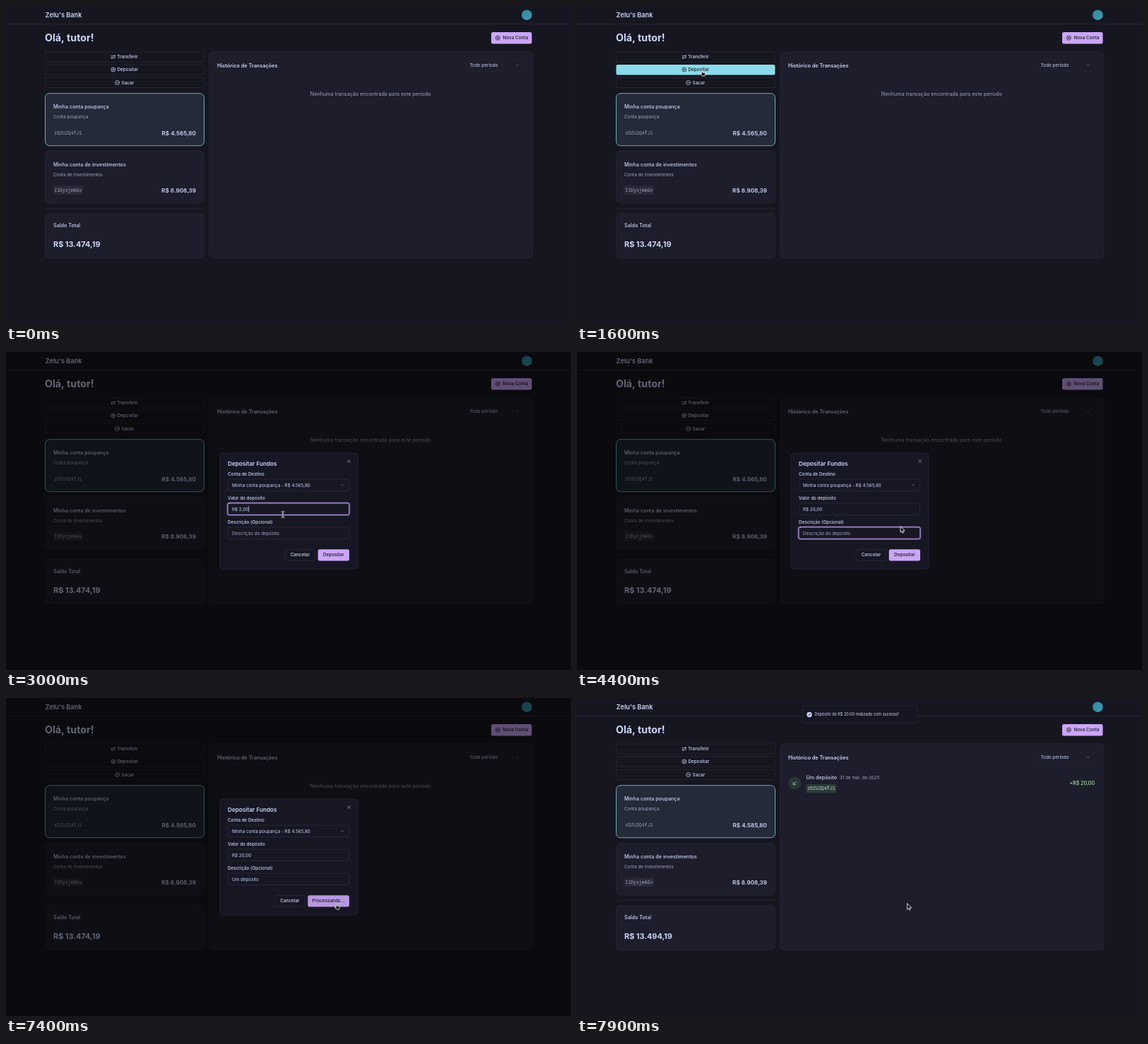
Recreate the animation shown at these times as an HTML page with a canvas. Size 800 by 450 pixels, loop 8 s.

```html
<!DOCTYPE html>
<html lang="pt-BR">
<head>
<meta charset="utf-8">
<title>Painel bancário</title>
<style>
html, body { margin: 0; width: 100%; height: 100%; overflow: hidden; background: #161621; }
canvas { display: block; width: 800px; height: 450px; }
</style>
</head>
<body>
<canvas id="stage"></canvas>
<script>
const canvas = document.getElementById('stage');
const ctx = canvas.getContext('2d');
const dpr = window.devicePixelRatio || 1;
canvas.width = 800 * dpr;
canvas.height = 450 * dpr;

const LOOP = 8000, STEP = 100;
const SANS = 'Inter, sans-serif', MONO = '"Noto Sans Mono", monospace';
const C = {
  bg: '#161621', card: '#1d1d2b', line: '#292939', faint: '#222231', text: '#cdd6f4',
  muted: '#a0a5bd', mauve: '#cba6f7', sky: '#89dceb', green: '#a6e3a1', dark: '#181825'
};
const T = { open: 1700, focusValue: 2300, focusNote: 4100, submit: 7200, close: 7500, update: 7700 };
const NOTE = 'Um depósito';

// Cursor way points: time, x, y
const PATH = [
  [300, 420, 330], [1300, 177, 91], [1600, 177, 91], [1700, 231, 110.5],
  [2200, 392, 226], [2400, 392, 230], [3400, 392, 230], [4100, 440, 256],
  [4400, 458, 247], [6700, 458, 247], [7100, 468, 291], [8000, 467.5, 291]
];

const INPUT_Y = { account: 180, value: 214, note: 248 };

function box(x, y, w, h, r, fill, stroke, lw = 0.7) {
  ctx.beginPath();
  ctx.roundRect(x, y, w, h, r);
  if (fill) { ctx.fillStyle = fill; ctx.fill(); }
  if (stroke) { ctx.strokeStyle = stroke; ctx.lineWidth = lw; ctx.stroke(); }
}

function text(s, x, mid, size, weight = 400, color = C.text, align = 'left', family = SANS) {
  ctx.font = `${weight} ${size}px ${family}`;
  ctx.textAlign = align;
  ctx.fillStyle = color;
  ctx.fillText(s, x, mid + size * 0.35);
}

function lines(color, lw, ...parts) {
  ctx.beginPath();
  for (const p of parts) {
    ctx.moveTo(p[0], p[1]);
    for (let i = 2; i < p.length; i += 2) ctx.lineTo(p[i], p[i + 1]);
  }
  ctx.strokeStyle = color;
  ctx.lineWidth = lw;
  ctx.lineCap = ctx.lineJoin = 'round';
  ctx.stroke();
}

function disc(x, y, r, fill, stroke) {
  ctx.beginPath();
  ctx.arc(x, y, r, 0, Math.PI * 2);
  if (fill) { ctx.fillStyle = fill; ctx.fill(); }
  if (stroke) { ctx.strokeStyle = stroke; ctx.lineWidth = 0.75; ctx.stroke(); }
}

function circleIcon(x, y, color, plus) {
  disc(x, y, 3, null, color);
  lines(color, 0.75, [x - 1.3, y, x + 1.3, y]);
  if (plus) lines(color, 0.75, [x, y - 1.3, x, y + 1.3]);
}

function chevron(x, y) {
  lines('#777b91', 0.7, [x - 1.7, y - 0.8, x, y + 0.8, x + 1.7, y - 0.8]);
}

function swapIcon(x, y, color) {
  lines(color, 0.75,
    [x - 2.8, y - 1.3, x + 2.8, y - 1.3], [x + 1.5, y - 2.5, x + 2.8, y - 1.3, x + 1.5, y - 0.2],
    [x + 2.8, y + 1.4, x - 2.8, y + 1.4], [x - 1.5, y + 0.3, x - 2.8, y + 1.4, x - 1.5, y + 2.6]);
}

function actionButton(y, label, labelX, icon, hot) {
  const color = hot ? C.dark : C.text;
  if (hot) box(55.5, y - 7, 225, 14.4, 2, C.sky);
  else box(55.5, y - 7, 225, 14, 2, C.bg, C.line);
  icon(color);
  text(label, labelX, y, 6.4, 500, color);
}

function account(y, name, kind, code, total, active) {
  box(55.5, y, 225, 74, 6, active ? '#232a38' : C.card, active ? '#78bcc8' : C.line, active ? 0.9 : 0.7);
  text(name, 67, y + 19, 7.2, 500);
  text(kind, 67, y + 33.5, 6.3, 400, C.muted);
  if (!active) box(66.5, y + 49.5, 42.5, 12.5, 2, '#2a2a39');
  text(code, 68.3, y + 56, 6.5, 400, C.muted, 'left', MONO);
  text(total, 269, y + 56, 8.2, 600, C.text, 'right');
}

function transaction() {
  disc(308.3, 120.5, 9, '#2a3439');
  lines(C.green, 0.8, [310.3, 118.5, 306.3, 122.5], [306.3, 119.4, 306.3, 122.5, 309.4, 122.5]);
  text(NOTE, 324.5, 112.5, 7.2, 500);
  text('31 de mai. de 2025', 372, 112.5, 6.3, 400, C.muted);
  box(324.5, 122, 42.5, 12.5, 2, '#2c3a3c');
  text('rDZU2Q4fJS', 326.3, 128.2, 6.5, 400, '#b9e8b8', 'left', MONO);
  text('+R$ 20,00', 733, 121, 7.1, 500, C.green, 'right');
}

function page(t, pos) {
  const done = t >= T.update;
  const free = t < T.open;
  const hot = (top) => free && t >= PATH[0][0] && inside(pos, 55, top, 281, top + 14);

  ctx.fillStyle = C.bg;
  ctx.fillRect(0, 0, 800, 450);
  lines('#27273a', 0.8, [0, 25.5, 800, 25.5]);
  text("Zelu's Bank", 55.5, 12.5, 9.2, 600);
  const glow = ctx.createLinearGradient(731, 6, 743, 20);
  glow.addColorStop(0, '#2d8ba0');
  glow.addColorStop(1, '#4299ad');
  disc(737.4, 12.7, 7.3, glow);

  text('Olá, tutor!', 55, 45.5, 14.2, 700);
  box(687, 37, 57.5, 16.5, 2.5, C.mauve);
  circleIcon(696.3, 45.2, C.dark, true);
  text('Nova Conta', 703.5, 45.2, 6.4, 500, C.dark);

  actionButton(72, 'Transferir', 157, (c) => swapIcon(151.8, 72, c), hot(65));
  actionButton(90, 'Depositar', 157.5, (c) => circleIcon(151.8, 90, c, true), hot(83));
  actionButton(108.5, 'Sacar', 163.5, (c) => circleIcon(157.6, 108.5, c, false), hot(101.5));

  account(123.7, 'Minha conta poupança', 'Conta poupança', 'rDZU2Q4fJS',
    done ? 'R$ 4.585,80' : 'R$ 4.565,80', true);
  account(205, 'Minha conta de investimentos', 'Conta de investimentos', 'I1DysjmAGv', 'R$ 8.908,39', false);
  lines(C.line, 0.7, [55, 286.5, 281, 286.5]);
  box(55.5, 293.5, 225, 63, 6, C.card, C.line);
  text('Saldo Total', 67, 310.7, 7.2, 500);
  text(done ? 'R$ 13.494,19' : 'R$ 13.474,19', 67, 337, 10.9, 700);

  box(287.5, 64.7, 458.5, 291.8, 6, C.card, C.line);
  text('Histórico de Transações', 299, 84, 7.3, 600);
  box(652, 76, 81, 16.5, 2.5, null, '#252535');
  text('Todo período', 656.5, 84, 6.35);
  chevron(723.7, 84);
  if (done) transaction();
  else text('Nenhuma transação encontrada para este período', 516.3, 124, 7.2, 400, C.muted, 'center');
}

function field(y, label, value, color, focused) {
  text(label, 314, y - 6.8, 6.3, 500);
  if (focused) {
    box(313.6, y - 0.5, 172.6, 17.2, 3, null, 'rgba(203,166,247,.45)', 2.2);
    box(314, y, 171.8, 16.3, 2.5, C.dark, C.mauve, 0.9);
  } else {
    box(314.3, y, 171.4, 16.5, 2.5, null, '#2c2c3d');
  }
  text(value, 320, y + 8.3, 6.3, 400, color);
}

function caret(y, value) {
  ctx.font = `400 6.3px ${SANS}`;
  const x = 320 + ctx.measureText(value).width + 0.4;
  lines(C.text, 0.7, [x, y + 4.5, x, y + 12]);
}

function amount(t) {
  const keys = Math.max(0, Math.min(4, Math.floor((t - 2400) / 200)));
  return ['0,00', '0,02', '0,20', '2,00', '20,00'][keys];
}

// A first letter is typed, erased, then the whole note follows.
function note(t) {
  if (t >= 5900) return NOTE.slice(0, 1 + Math.floor((t - 5900) / 70));
  return t >= 5300 && t < 5600 ? 'U' : '';
}

function dialog(t) {
  const busy = t >= T.submit;
  const onValue = t >= T.focusValue && t < T.focusNote;
  const onNote = t >= T.focusNote && t < T.submit;
  const value = 'R$ ' + amount(t);
  const words = note(t);
  const scale = t < T.open + 100 ? 0.995 : 1;

  ctx.save();
  ctx.translate(400.5, 225);
  ctx.scale(scale, scale);
  ctx.translate(-400.5, -225);
  box(303, 143, 195, 164, 4.5, '#171724', '#2b2b3c');
  text('Depositar Fundos', 314, 158, 8.2, 600);
  lines('#a3a8bd', 0.75, [483.8, 152.8, 487.4, 156.4], [487.4, 152.8, 483.8, 156.4]);
  field(INPUT_Y.account, 'Conta de Destino', 'Minha conta poupança - R$ 4.565,80', C.text, false);
  chevron(476.3, 188.3);
  field(INPUT_Y.value, 'Valor do depósito', value, value === 'R$ 0,00' ? C.muted : C.text, onValue);
  field(INPUT_Y.note, 'Descrição (Opcional)', words || 'Descrição do depósito', words ? C.text : C.muted, onNote);

  if (onValue && (t >= 2500 && t < 3500 || Math.floor((t - T.focusValue) / 300) % 2 === 0)) caret(INPUT_Y.value, value);
  const blink = Math.floor((t - T.focusNote) / 300) % 2 === 0;
  if (onNote && (t >= 5300 && t !== 5700 && t !== 5800 || blink)) caret(INPUT_Y.note, words);

  const left = busy ? 427.3 : 441.7;
  box(left - 46.5, 279.3, 42, 16, 2.5, null, '#2a2a3b');
  text('Cancelar', left - 25.4, 287.2, 6.4, 500, C.text, 'center');
  box(left, 279.2, 486 - left, 16.3, 2.5, busy ? '#b897e0' : C.mauve);
  text(busy ? 'Processando...' : 'Depositar', (left + 486) / 2, 287.2, 6.4, 500, C.dark, 'center');
  ctx.restore();
}

function toast() {
  box(319.7, 11, 162, 24.5, 3, '#161622', '#27273a');
  disc(329, 23.5, 3.7, C.text);
  lines(C.dark, 0.9, [327.4, 23.6, 328.6, 24.8, 330.7, 22.3]);
  text('Depósito de R$ 20.00 realizado com sucesso!', 336.5, 23.5, 5.5);
}

function inside([x, y], x0, y0, x1, y1) {
  return x >= x0 && x <= x1 && y >= y0 && y <= y1;
}

function cursorAt(t) {
  let i = 0;
  while (i < PATH.length - 2 && t >= PATH[i + 1][0]) i++;
  const [t0, x0, y0] = PATH[i], [t1, x1, y1] = PATH[i + 1];
  const p = Math.max(0, Math.min(1, (t - t0) / (t1 - t0)));
  const e = p * p * (3 - 2 * p);
  return [x0 + (x1 - x0) * e, y0 + (y1 - y0) * e];
}

function cursorKind(t, pos) {
  if (t < T.open || t >= T.close) {
    return inside(pos, 55, 65, 281, 279) ? 'hand' : 'arrow';
  }
  if (inside(pos, 314, 214, 486, 231) || inside(pos, 314, 248, 486, 265)) return 'beam';
  return inside(pos, 441, 279, 486, 296) ? 'hand' : 'arrow';
}

const SHAPES = {
  arrow: 'M0 0V8.2L1.9 6.5L3.1 9.3L4.4 8.7L3.2 6H5.8Z',
  hand: 'M-.7 .3Q0-.6 .7 .3V3L3.6 3.6Q4.6 3.9 4.4 5L3.8 8H0L-2.3 4.9Q-2.2 3.9-.7 5Z'
};

function cursor(kind, [x, y]) {
  ctx.save();
  ctx.translate(x, y);
  if (kind === 'beam') {
    const bars = [[-1.5, -4, 1.5, -4], [0, -4, 0, 4], [-1.5, 4, 1.5, 4]];
    lines('#eee', 1.7, ...bars);
    lines('#111', 0.6, ...bars);
  } else {
    const shape = new Path2D(SHAPES[kind]);
    ctx.lineJoin = 'round';
    ctx.fillStyle = '#08080c';
    ctx.strokeStyle = '#e8e8ee';
    ctx.lineWidth = 0.9;
    ctx.fill(shape);
    ctx.stroke(shape);
  }
  ctx.restore();
}

function draw(now) {
  const t = Math.floor((now % LOOP) / STEP) * STEP;
  const pos = cursorAt(t);
  ctx.setTransform(dpr, 0, 0, dpr, 0, 0);
  page(t, pos);

  const fade = t === T.close ? 0.5 : 1;
  if (t >= T.open && t <= T.close) {
    ctx.globalAlpha = fade;
    ctx.fillStyle = 'rgba(0,0,0,.53)';
    ctx.fillRect(0, 0, 800, 450);
    dialog(t);
  }
  if (t >= T.close) {
    ctx.globalAlpha = fade;
    toast();
  }
  ctx.globalAlpha = 1;
  if (t >= PATH[0][0]) cursor(cursorKind(t, pos), pos);
}

const start = performance.now();
function tick() {
  draw(performance.now() - start);
  requestAnimationFrame(tick);
}
tick();
</script>
</body>
</html>
```
